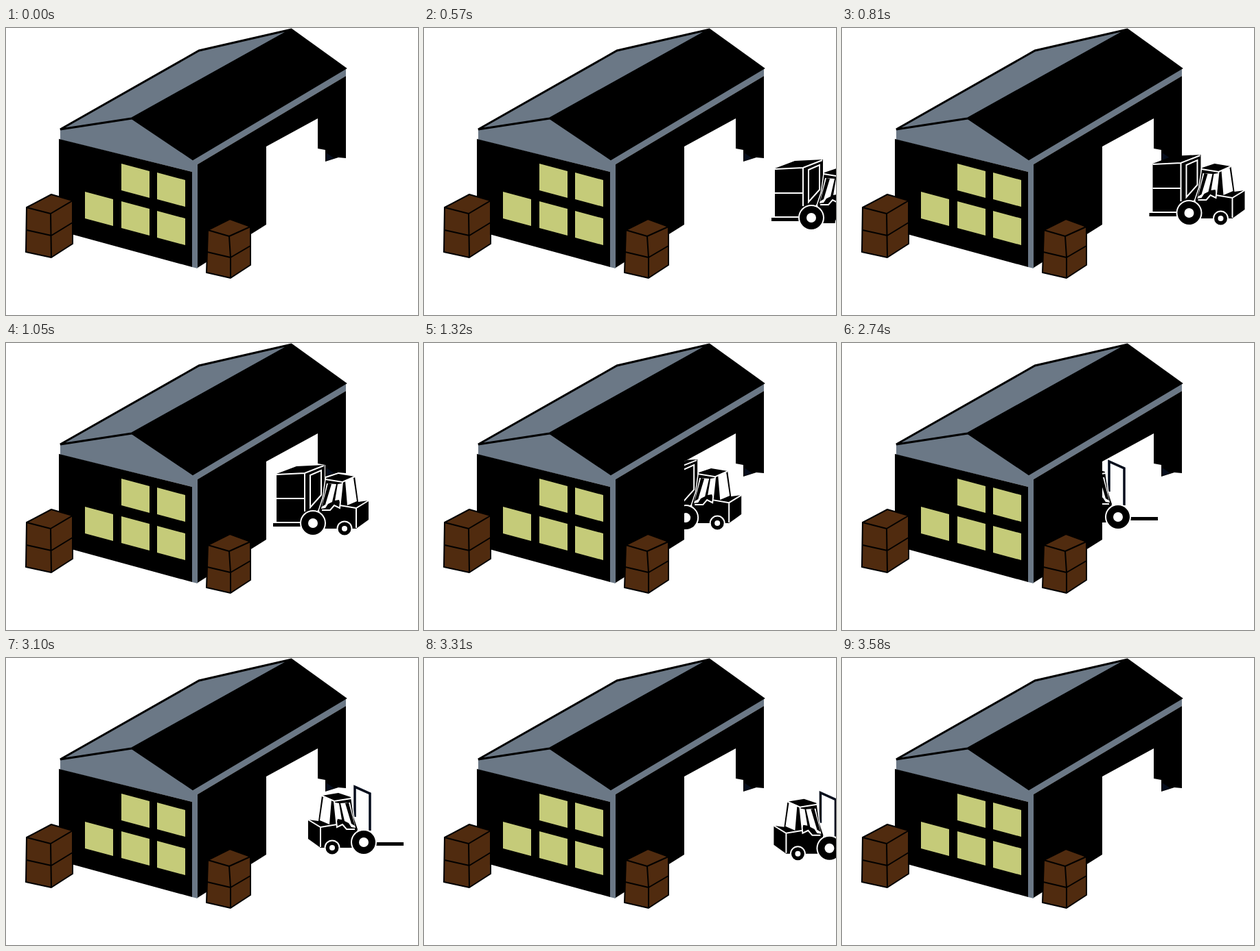
An HTML page for the animation above (4.67 s loop, 600 by 419 pixels).

```html
<!DOCTYPE html>
<html lang="en">
<head>
<meta charset="utf-8">
<title>Warehouse forklift</title>
<style>
  html, body { margin: 0; height: 100%; overflow: hidden; background: #fff; }
  svg { display: block; width: 100vw; height: 100vh; }
  .steel { fill: #6b7886; }
  .window { fill: #c5cb79; }
  .crate { fill: #502b0f; stroke: #000; stroke-width: 2; stroke-linejoin: round; }
  .line { fill: none; stroke: #fff; stroke-width: 2; }
  .glass { fill: #fff; }
</style>
</head>
<body>
<svg viewBox="0 0 600 419">
  <defs>
    <clipPath id="outside"><path d="M379 173L454 132H600V419H379z"/></clipPath>
    <path id="pane" class="window" d="M0 0L41 11V50L0 39z"/>

    <g id="forklift">
      <path d="M466 197L484 191L508 195L513 232L528 230V258L510 271H462L456 244L462 226z"
            stroke="#fff" stroke-width="3" paint-order="stroke"/>
      <path class="glass" d="M494 201L506 197L511 231L497 237z"/>
      <path class="glass" d="M467 205L481 206L475 232L469 235L465 241L459 242z"/>
      <path class="glass" d="M483 206L489 205L487 236L485 229L479 230z"/>
      <path class="line" d="M465 199L490 203L508 195M490 203L486 241L478 237L472 244H460"/>
      <path class="line" stroke-width="1.5" d="M486 237L510 241L528 230M510 241V270"/>
      <path d="M469 205L474 206L465 236L460 239z"/>
      <path d="M389 263H430V268H389z"/>
      <circle cx="447" cy="263" r="19" fill="#fff"/>
      <circle cx="447" cy="263" r="17"/>
      <circle cx="447" cy="263" r="7" fill="#fff"/>
      <circle cx="493" cy="271" r="11.5" fill="#fff"/>
      <circle cx="493" cy="271" r="9.5"/>
      <circle cx="493" cy="271" r="4" fill="#fff"/>
    </g>
  </defs>

  <g id="building">
    <path class="steel" d="M79 148L183 132L272 192L495 59V70L279 199V351L271 349V210L79 163z"/>
    <path class="steel" d="M79 148L281 33L416 2L183 132z" stroke="#000" stroke-width="3"/>
    <path d="M183 132L416 2L495 59L272 192z" stroke="#000" stroke-width="2"/>
    <path d="M77 162L271 210V349L77 296z"/>
    <path d="M279 199L495 70V190L484 189L465 195V178L454 176V132L379 173V287L279 350z"/>
    <path d="M466 182L478 190L466 194z" fill="#050d1c"/>
    <use href="#pane" x="168" y="198"/>
    <use href="#pane" x="220" y="211"/>
    <use href="#pane" x="115" y="239"/>
    <use href="#pane" x="168" y="253"/>
    <use href="#pane" x="220" y="267"/>
  </g>

  <g class="crate">
    <path d="M30 262L66 243L97 252V315L66 335L29 327z"/>
    <path d="M30 262L65 271L97 252M65 271L66 335M30 295L66 303L97 284" fill="none"/>
    <path d="M294 295L326 279L356 290V346L327 365L292 357z"/>
    <path d="M294 295L325 304L356 290M325 304L327 335V365M293 327L327 335L356 318" fill="none"/>
  </g>

  <g clip-path="url(#outside)">
    <g id="arriving">
      <path d="M394 191L423 180L464 178V235L436 261H394z"/>
      <path class="line" d="M394 192L435 190L463 179M435 190V246M394 227H435"/>
      <path class="line" d="M443 193L459 186V222L443 240z"/>
      <use href="#forklift"/>
    </g>
    <g id="leaving">
      <path d="M460 226V182L438 192V246" fill="none" stroke="#050d1c" stroke-width="3.5"/>
      <use href="#forklift"/>
    </g>
  </g>
</svg>
<script>
const LOOP = 4670, STEP = 30;
const arriving = document.getElementById('arriving');
const leaving = document.getElementById('leaving');

// Shows a truck from start to end, with its position held for each step.
function drive(truck, time, start, end, place) {
  const active = time >= start && time < end;
  truck.style.display = active ? '' : 'none';
  if (active) {
    const elapsed = Math.floor((time - start) / STEP) * STEP;
    truck.setAttribute('transform', place(elapsed));
  }
}

function draw(now) {
  const time = now % LOOP;
  drive(arriving, time, 210, 1770, e =>
    `translate(${(840 - e) * 0.24375} ${(840 - e) * 0.0292})`);
  drive(leaving, time, 2500, 3580, e =>
    `translate(${968 + (e - 600) * 0.3306} ${6 + (e - 600) * 0.0417}) scale(-1 1)`);
  requestAnimationFrame(draw);
}
draw(0);
</script>
</body>
</html>
```
